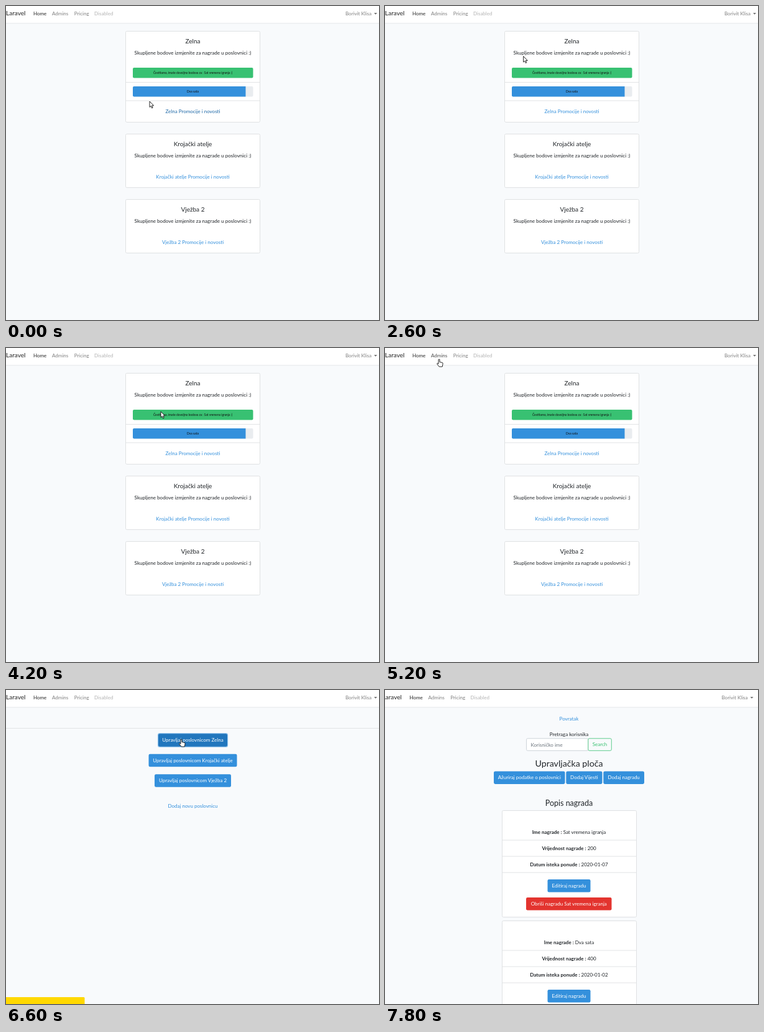
Recreate the animation shown at these times as an HTML page. Size 600 by 504 pixels, loop 8000 ms.

```html
<!DOCTYPE html>
<html lang="hr">
<head>
<meta charset="utf-8">
<title>Nagrade</title>
<style>
  html, body { margin: 0; width: 100%; height: 100%; overflow: hidden; background: #f8fafc; }
  svg { display: block; width: 600px; height: 504px; font: 8px Lato, "Open Sans", sans-serif; }
</style>
</head>
<body>
<svg id="stage" viewBox="0 0 600 504"></svg>
<script>
const LOOP = 8000, STEP = 200;
const BLUE = '#3490dc', GREEN = '#38c172', RED = '#e3342f', INK = '#212529';
const USER = 'Borivit Klisa';
const SHOPS = ['Zelna', 'Krojački atelje', 'Vježba 2'];
const ADMINS_AT = 5600, PANEL_AT = 7000;

// Pointer way points: time, x, y
const POINTER = [
  [0, 231, 153], [400, 231, 153], [1000, 73, 14], [1200, 89, 16],
  [1600, 89, 16], [2200, 209, 72], [2400, 209, 72], [3000, 250, 98],
  [3400, 250, 98], [4200, 249, 102], [4400, 249, 102], [5200, 87, 18],
  [5600, 87, 18], [6200, 282, 79], [8000, 282, 79]
];

const stage = document.getElementById('stage');

const rect = (x, y, w, h, fill, extra = '') =>
  `<rect x="${x}" y="${y}" width="${w}" height="${h}" fill="${fill}" ${extra}/>`;
const text = (x, y, content, fill = INK, size = 8, anchor = 'middle') =>
  `<text x="${x}" y="${y}" fill="${fill}" font-size="${size}" text-anchor="${anchor}">${content}</text>`;
const rule = (x, y, w) => rect(x, y, w, 1, '#e2e4e6');
const box = (x, y, w, h) =>
  rect(x + .5, y + .5, w - 1, h - 1, '#fff', 'rx="2" stroke="#dfe1e3"');
const button = (x, y, w, label, fill = BLUE, extra = '') =>
  rect(x, y, w, 20.5, fill, 'rx="2.3" ' + extra) + text(x + w / 2, y + 13, label, '#fff');

function pointerAt(time) {
  const i = POINTER.findIndex(p => p[0] > time);
  const [t0, x0, y0] = POINTER[i - 1], [t1, x1, y1] = POINTER[i];
  const k = (time - t0) / (t1 - t0);
  return { x: x0 + (x1 - x0) * k, y: y0 + (y1 - y0) * k };
}

function cursor({ x, y }, hand) {
  const shape = hand
    ? 'M-1 .9C-1 -.4 1 -.4 1 .9V4.6L5 5.4Q6.3 5.8 6.1 7.2L5.2 12H.2L-3.3 7.7Q-3.4 6.2 -2.2 6.5L-1 7.5Z'
    : 'M0 0V9.4L2.1 7.5L3.6 10.9L5.1 10.2L3.7 6.9H6.6Z';
  return `<path transform="translate(${x} ${y})" d="${shape}" fill="#fff" stroke="#111" stroke-width=".9" stroke-linejoin="round"/>`;
}

function navbar(left, onAdmins) {
  const shade = a => `rgba(0,0,0,${a})`;
  const item = (x, label, alpha, size) => text(x, 15, label, shade(alpha), size, 'start');
  return rect(0, 27, 600, 1, '#eceef0') + rect(0, 28, 600, 1, '#f3f5f7') + rect(0, 0, 600, 27, '#fff') +
    `<g transform="translate(${left})">` +
    item(0, 'Laravel', .85, 10.1) + item(44, 'Home', .85) +
    item(74, 'Admins', onAdmins ? .7 : .5) + item(109.7, 'Pricing', .5) + item(142, 'Disabled', .3) +
    text(588, 15, USER, shade(.5), 8, 'end') +
    `<path d="M592 11h5l-2.5 2.7z" fill="${shade(.55)}"/></g>`;
}

function shopCard(y, height, shop, linkY, linkColor, selected) {
  return box(192, y, 217, height) + text(300.5, y + 20.2, shop, INK, 10) +
    (selected ? rect(207.5, y + 29, 186, 13, '#3390ff') : '') +
    text(300.5, y + 38, 'Skupljene bodove izmjenite za nagrade u poslovnici :)', selected ? '#fff' : INK, 8.1) +
    text(300.5, linkY, shop + ' Promocije i novosti', linkColor);
}

function homePage(time) {
  const selected = time >= 2800 && time < 3600;
  return shopCard(40, 147, SHOPS[0], 171.8, time < 600 ? '#1d68a7' : BLUE, selected) +
    rect(204, 99, 193.5, 16.5, GREEN, 'rx="2"') +
    text(300.5, 109, 'Čestitamo, imate dovoljno bodova za : Sat vremena igranja :)', '#111', 4.85) +
    rule(193, 122, 215) +
    rect(204, 129, 193.5, 16.5, '#e9ecef', 'rx="2"') +
    `<path d="M385.5 129H206q-2 0-2 2v12.5q0 2 2 2h179.5z" fill="${BLUE}"/>` +
    text(300.5, 139, 'Dva sata', '#111', 5) +
    rule(193, 151.5, 215) +
    shopCard(205, 87, SHOPS[1], 277, BLUE) +
    shopCard(310, 87, SHOPS[2], 382, BLUE);
}

function adminsPage(time, overButton) {
  const focused = time >= 6600;
  const ring = focused ? 'stroke="#99c7ed" stroke-width="2.4" paint-order="stroke"' : '';
  const fill = focused ? '#2176bd' : overButton ? '#227dc7' : BLUE;
  const label = i => 'Upravljaj poslovnicom ' + SHOPS[i];
  return rule(0, 61, 600) +
    button(245, 70.3, 111, label(0), fill, ring) +
    button(229.5, 102.8, 142, label(1)) +
    button(239, 135.3, 123, label(2)) +
    text(300.5, 189.2, 'Dodaj novu poslovnicu', BLUE) +
    (focused ? rect(-2, 493, 128.5, 13, '#ffd800', 'rx="1.5"') : '');
}

function rewardCard(y, name, value, date) {
  const rows = [['Ime nagrade', name], ['Vrijednost nagrade', value], ['Datum isteka ponude', date]];
  return box(188, y, 217, 172) +
    rows.map(([label, content], i) =>
      text(296, y + 38 + 26 * i, `<tspan font-weight="700">${label} :</tspan> ${content}`) +
      rule(189, y + 47.5 + 26 * i, 215)).join('') +
    button(261.5, y + 111, 69, 'Editiraj nagradu') +
    button(227, y + 140, 137.5, 'Obriši nagradu ' + name, RED);
}

function panelPage() {
  return text(296, 48.8, 'Povratak', BLUE) +
    text(296, 74, 'Pretraga korisnika') +
    rect(227.5, 77.8, 99.5, 19.5, '#fff', 'rx="2" stroke="#ced4da"') +
    text(234.5, 90.5, 'Korisničko ime', '#6c757d', 8, 'start') +
    rect(326.8, 77.8, 37.5, 19.5, '#f8fafc', `rx="2" stroke="${GREEN}" stroke-width=".8"`) +
    text(345.5, 90.2, 'Search', GREEN) +
    text(296, 122.6, 'Upravljačka ploča', INK, 14.2) +
    button(175, 130.4, 114.5, 'Ažuriraj podatke o poslovnici') +
    button(291.3, 130.4, 58.2, 'Dodaj Vijesti') +
    button(351.3, 130.4, 65.7, 'Dodaj nagradu') +
    text(296, 186, 'Popis nagrada', INK, 12.5) +
    rewardCard(193, 'Sat vremena igranja', 200, '2020-01-07') +
    rewardCard(370, 'Dva sata', 400, '2020-01-02');
}

function draw(time) {
  const pointer = pointerAt(time), { x, y } = pointer;
  const onPanel = time >= PANEL_AT, onAdminsPage = time >= ADMINS_AT && !onPanel;
  const overNav = x > 74 && x < 101 && y > 5 && y < 24;
  const overButton = onAdminsPage && x > 245 && x < 356 && y > 70 && y < 91;
  const page = onPanel ? panelPage() : onAdminsPage ? adminsPage(time, overButton) : homePage(time);
  stage.innerHTML = navbar(onPanel ? -4.5 : 0, overNav) + page +
    (time < 7800 ? cursor(pointer, overNav || overButton) : '');
}

const start = performance.now();
let shown = -1;
function tick() {
  const time = Math.floor((performance.now() - start) % LOOP / STEP) * STEP;
  if (time !== shown) draw(shown = time);
  requestAnimationFrame(tick);
}
tick();
</script>
</body>
</html>
```
